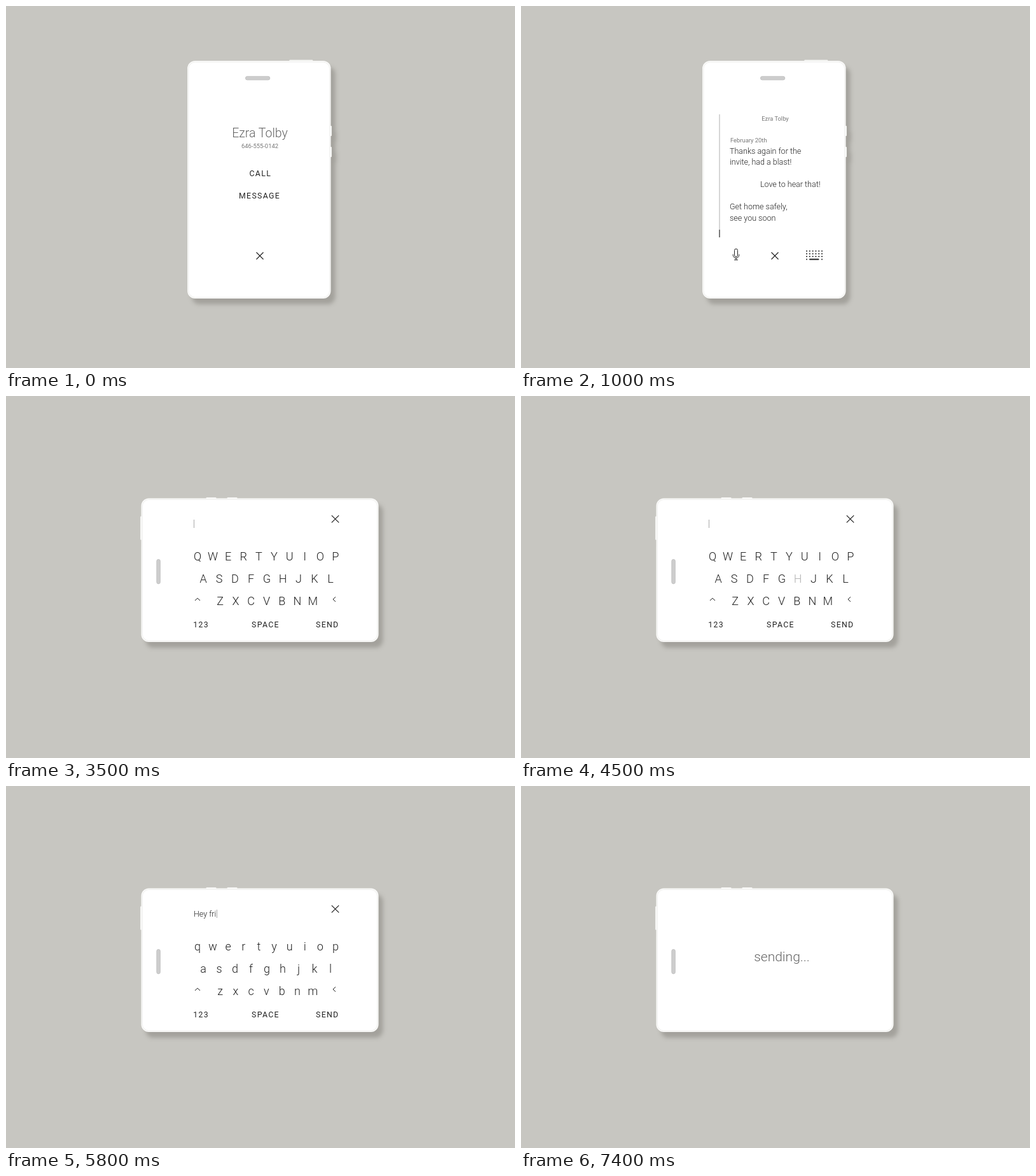
Write an HTML page that moves like this. It is 800x568 px and loops after 8 s.

```html
<!DOCTYPE html>
<html lang="en">
<head>
<meta charset="utf-8">
<title>Phone message</title>
<style>
  html, body { margin: 0; width: 100%; height: 100%; overflow: hidden; background: #c7c6c1; }
  svg { display: block; width: 800px; height: 568px; }
  text { font-family: Roboto, sans-serif; font-weight: 300; white-space: pre; fill: #222; }
  .title { font-size: 19.5px; fill: #666; text-anchor: middle; }
  .small { font-size: 9.4px; font-weight: 400; fill: #777; }
  .body { font-size: 12.5px; }
  .action { font-size: 12.3px; font-weight: 400; letter-spacing: 1.35px; }
  .key { font-size: 18px; text-anchor: middle; }
  .middle { text-anchor: middle; }
  .line { fill: none; stroke: #222; stroke-width: 1.2; }
  .pressed { opacity: .35; }
  .icon.pressed { opacity: .5; }
  #shadow { filter: drop-shadow(7px 9px 3px rgba(60, 58, 50, .26)); }
</style>
</head>
<body>
<svg viewBox="0 0 800 568">
  <g id="shadow">
    <g id="phone">
      <g fill="#f3f3f1">
        <rect x="47.5" y="-188" width="37" height="4" rx="1"/>
        <rect x="110" y="-84.5" width="4.2" height="16" rx="1"/>
        <rect x="110" y="-51.5" width="4.2" height="16" rx="1"/>
      </g>
      <rect x="-112.7" y="-186.5" width="225.4" height="373" rx="12" fill="#fbfbfa"/>
      <rect x="-110.9" y="-184.7" width="221.8" height="369.4" rx="10.5" fill="#fff" stroke="#ebebe9" stroke-width=".8"/>
      <rect x="-21.4" y="-162.2" width="38.4" height="5.6" rx="2.8" fill="#cdcdcd" stroke="#bebebe" stroke-width=".8"/>
    </g>
  </g>

  <g id="contact">
    <text class="title" x="399" y="206">Ezra Tolby</text>
    <text class="small middle" x="399" y="222.5">646-555-0142</text>
    <text class="action" x="382.5" y="266.5">CALL</text>
    <text class="action" id="message" x="366" y="301.6">MESSAGE</text>
    <path class="line" d="M393.5 386.5l11 11m0-11l-11 11"/>
  </g>

  <g id="thread">
    <path class="line" d="M312 170V351" style="stroke:#bbb"/>
    <path class="line" d="M312 351V363"/>
    <text class="small middle" x="399.5" y="179.5">Ezra Tolby</text>
    <text class="small" x="329" y="214">February 20th</text>
    <text class="body" x="328" y="232">Thanks again for the</text>
    <text class="body" x="328" y="249">invite, had a blast!</text>
    <text class="body" x="470.5" y="284" text-anchor="end">Love to hear that!</text>
    <text class="body" x="328" y="319.3">Get home safely,</text>
    <text class="body" x="328" y="336.5">see you soon</text>
    <g class="line" style="stroke-width:1">
      <rect x="335.5" y="381" width="5" height="12.5" rx="2.5"/>
      <path d="M333.2 389.5v1.2a4.8 4.8 0 0 0 9.6 0v-1.2M338 395.5v3M335 398.3h6"/>
    </g>
    <path class="line" d="M393.5 386.5l11 11m0-11l-11 11"/>
    <g id="keyboardIcon" class="icon"></g>
  </g>

  <g id="typing">
    <text class="body" id="typed" x="295" y="205"></text>
    <path id="cursor" class="line" d="M0 194v13" style="stroke:#aaa;stroke-width:1"/>
    <path class="line" d="M511.8 187.3l11.4 11.4m0-11.4l-11.4 11.4"/>
    <g id="keys"></g>
    <path class="line" style="stroke-width:1" d="M297 321l4-3.8l4 3.8M518 315.2l-4 3.8l4 3.8"/>
    <text class="action" x="294.3" y="362.5">123</text>
    <text class="action" id="space" x="386" y="362.5">SPACE</text>
    <text class="action" id="send" x="487" y="362.5">SEND</text>
  </g>

  <g id="sending">
    <text class="title" x="410" y="275" style="font-size:21px">sending...</text>
  </g>
</svg>
<script>
const LOOP = 8000, PHRASE = 'Hey friend', TYPE_START = 4500, STEP = 100;
const $ = id => document.getElementById(id);

function add(parent, tag, attributes, text = '') {
  const node = document.createElementNS('http://www.w3.org/2000/svg', tag);
  for (const name in attributes) node.setAttribute(name, attributes[name]);
  node.textContent = text;
  return parent.appendChild(node);
}

for (let row = 0; row < 4; row++) {
  for (let column = 0; column < 6; column++) {
    if (row === 3 && column % 5) continue;
    add($('keyboardIcon'), 'circle',
      { cx: 449 + column * 4.8, cy: 384.4 + row * 4.35, r: 1, fill: '#222' });
  }
}
add($('keyboardIcon'), 'rect', { x: 453, y: 396.4, width: 15.5, height: 2, rx: 1, fill: '#222' });

const keys = [
  ['qwertyuiop', 301, 24.1, 258],
  ['asdfghjkl', 310, 25, 293],
  ['zxcvbnm', 336.7, 24.25, 328]
].flatMap(([letters, x, gap, y]) => [...letters].map((letter, i) =>
  ({ letter, node: add($('keys'), 'text', { class: 'key', x: x + i * gap, y }) })));

const show = (id, visible) => { $(id).style.display = visible ? '' : 'none'; };
const press = (node, down) => node.classList.toggle('pressed', down);

function draw(t) {
  const landscape = t >= 3500;
  $('phone').setAttribute('transform',
    landscape ? 'translate(399 273.3) rotate(-90)' : 'translate(397.8 272.6)');
  show('contact', t < 1000);
  show('thread', t >= 1000 && !landscape);
  show('typing', landscape && t < 7400);
  show('sending', t >= 7400);
  press($('message'), t >= 500);
  press($('keyboardIcon'), t >= 3000);
  press($('send'), t >= 6900);

  // Each letter takes two steps: key down, then the letter appears.
  const step = Math.floor((t - TYPE_START) / STEP);
  const count = Math.max(0, Math.min(PHRASE.length, Math.floor((step + 1) / 2)));
  const down = step >= 0 && step % 2 === 0 ? (PHRASE[step / 2] || '').toLowerCase() : '';
  press($('space'), down === ' ');
  for (const { letter, node } of keys) {
    node.textContent = count ? letter : letter.toUpperCase();
    press(node, letter === down);
  }
  $('typed').textContent = PHRASE.slice(0, count);
  const end = count && landscape ? $('typed').getComputedTextLength() + 1 : 0;
  $('cursor').setAttribute('transform', `translate(${Math.round(295 + end) + .5} 0)`);
}

const start = performance.now();
function tick() {
  draw((performance.now() - start) % LOOP);
  requestAnimationFrame(tick);
}
tick();
</script>
</body>
</html>
```
